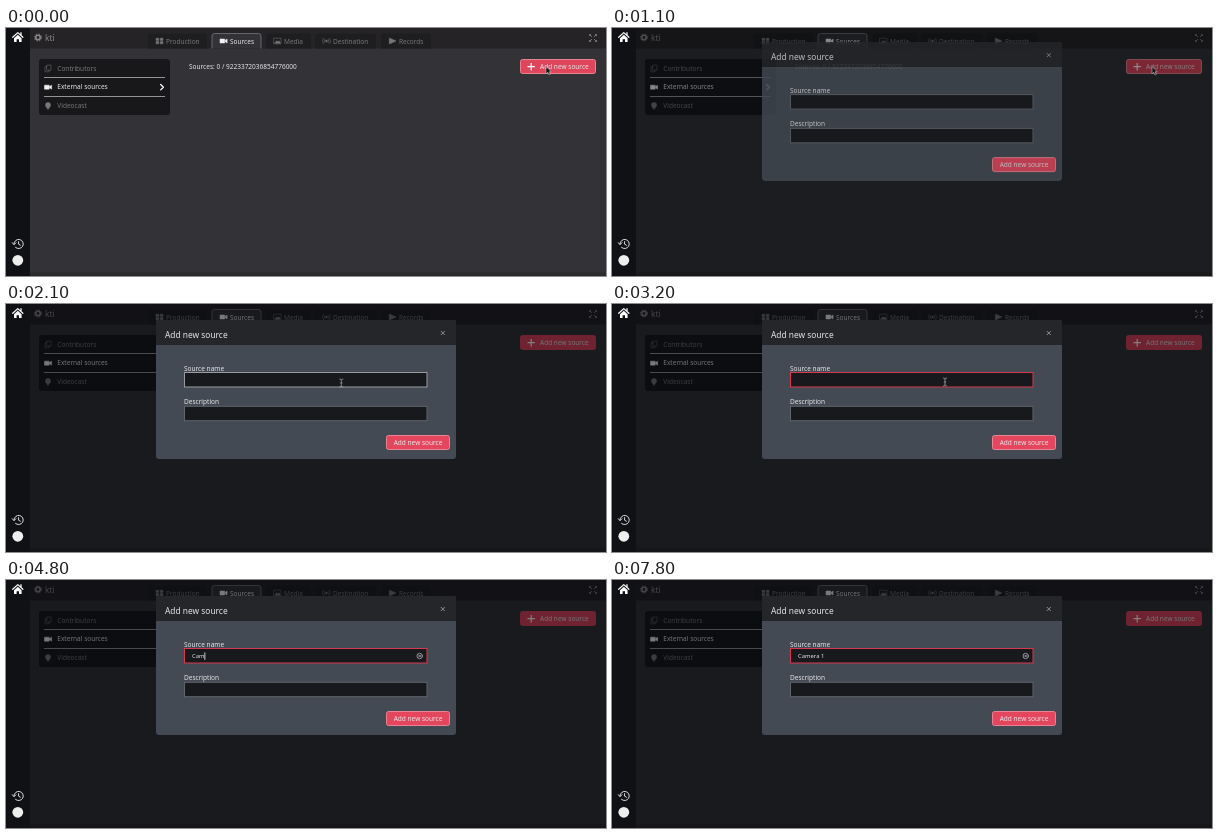
Recreate the animation shown at these times as an HTML page. Size 600 by 248 pixels, loop 8000 ms.

```html
<!DOCTYPE html>
<html lang="en">
<head>
<meta charset="utf-8">
<title>Add new source</title>
<style>
  html, body { margin: 0; width: 100%; height: 100%; overflow: hidden; background: #333337; }
  svg { display: block; width: 100%; height: 100%; }
  text { font: 6.53px "Noto Sans", "Open Sans", sans-serif; fill: #e6e6e8; white-space: pre; }
  .title { font-size: 8.4px; }
  .value { font-size: 5.9px; }
  .dim text { fill: #77777b; }
  .tab { fill: #1e1e21; }
  .line { fill: none; stroke-linecap: round; stroke-linejoin: round; }
</style>
</head>
<body>
<svg viewBox="0 0 600 248">
  <defs>
    <g id="camera"><path d="M-3.5-2h4.7v4h-4.7zM1.6-.6 3.6-2v4L1.6.6z"/></g>
    <g id="stack" class="line"><path d="M-1-3.2h4v5h-4zM-1-1.5h-2v5h4V1.8"/></g>
    <g id="pin"><path d="M0 3.6C-1 1.8-2.6.6-2.6-1a2.6 2.6 0 0 1 5.2 0C2.6.6 1 1.8 0 3.6z"/></g>
    <g id="grid"><path d="M-3.5-2.8h2.8v2.2h-2.8zM.7-2.8h2.8v2.2H.7zM-3.5.6h2.8v2.2h-2.8zM.7.6h2.8v2.2H.7z"/></g>
    <g id="image"><path class="line" d="M-3.5-2.8h7v5.6h-7z"/><path d="M-2.8 2.2-.8-.3.4 1 1.5-.3 2.9 2.2z"/></g>
    <g id="signal"><circle r=".9"/><path class="line" d="M-1.8-1.6q-1.2 1.6 0 3.2M1.8-1.6q1.2 1.6 0 3.2M-3.2-2.8q-1.8 2.8 0 5.6M3.2-2.8q1.8 2.8 0 5.6"/></g>
    <g id="play"><path d="M-3.2-3 3.6 0l-6.8 3z"/></g>
  </defs>

  <rect width="600" height="248" fill="#333337"/>
  <rect width="600" height="20.5" fill="#252326"/>
  <rect y="244.5" width="600" height="3.5" fill="#2c2a2d"/>
  <g stroke="#88888c" fill="none">
    <circle cx="32" cy="9.5" r="2.2" stroke-width="1.6"/>
    <circle cx="32" cy="9.5" r="3.5" stroke-width="1" stroke-dasharray="1.4 1.35"/>
    <path d="M583.5 8V6.5H585M589 6.5h1.5V8M590.5 12v1.5H589M585 13.5h-1.5V12M584 7l2 2M590 7l-2 2M590 13l-2-2M584 13l2-2" stroke-width=".8"/>
  </g>
  <text class="title" x="39" y="12.7" style="fill:#88888c">kti</text>

  <g id="tabs"></g>

  <rect x="33" y="31" width="131" height="56" rx="3" fill="#18181b"/>
  <path d="M38 49.5h121M38 68.5h121" stroke="#949498"/>
  <g id="menu"></g>
  <path class="line" d="m154.7 56.5 2.7 2.7-2.7 2.7" stroke="#fff" stroke-width="1.3"/>

  <text x="183" y="41.3">Sources: 0 / 9223372036854776000</text>

  <rect id="add" x="514.5" y="31.5" width="75" height="14" rx="2" fill="#df455b"/>
  <path d="M521.5 38.7h7.4M525.2 35v7.4" stroke="#fff" stroke-width="1.2"/>
  <text x="534" y="41.1">Add new source</text>

  <rect id="shade" width="600" height="248" fill="#010306"/>

  <g id="dialog">
    <rect x="150" y="16" width="300" height="139" rx="3" fill="#434a53"/>
    <path d="M150 41V19q0-3 3-3h294q3 0 3 3v22z" fill="#24262a"/>
    <text class="title" x="159" y="33.5">Add new source</text>
    <path d="m434.8 27 4 4m0-4-4 4" stroke="#a5a8ac" stroke-width=".8"/>
    <text x="178" y="66.6">Source name</text>
    <rect id="name" x="178.5" y="68.5" width="242.5" height="14.5" fill="#17191d"/>
    <text id="value" class="value" x="186" y="78.2"></text>
    <path id="caret" d="M0 72.5v7.3" stroke="#fff" stroke-width=".8"/>
    <g id="clear" class="line" stroke="#b0b2b6" stroke-width=".8">
      <circle cx="413.7" cy="76" r="2.7"/><path d="m412.7 75 2 2m0-2-2 2"/>
    </g>
    <text x="178" y="100">Description</text>
    <rect x="178.5" y="102.3" width="242.5" height="14.4" fill="#17191d" stroke="#60656c"/>
    <rect x="380.5" y="131.5" width="63" height="14" rx="2" fill="#e4475d" stroke="#e98391"/>
    <text x="387.7" y="141">Add new source</text>
  </g>

  <rect width="24" height="248" fill="#101115"/>
  <path class="line" d="m6.7 9.3 5.1-4.7 5.1 4.7M15 4.6v2.5" stroke="#fff" stroke-width="1.2"/>
  <path d="m8 10.2 3.8-3.5 3.8 3.5V14H13v-2.8h-2.4V14H8z" fill="#fff"/>
  <path class="line" d="M8 216a4.6 4.6 0 1 1 1.5 3.4M6.3 214.7 8 216.7l1.9-2M12.6 213.6v2.6l1.8 1" stroke="#ddd"/>
  <circle cx="11.8" cy="232.3" r="5.4" fill="#eee"/>

  <path id="arrow" d="M0 0v7.4l1.8-1.6 1.2 2.7 1.3-.6-1.2-2.6h2.3z" fill="#111" stroke="#ddd" stroke-width=".5"/>
  <path id="beam" class="line" d="M-1.6-4q1.6 0 1.6 1v6q0 1-1.6 1M1.6-4Q0-4 0-3M1.6 4Q0 4 0 3M-.8 0h1.6" stroke="#aaa" stroke-width=".7"/>
</svg>
<script>
const $ = id => document.getElementById(id);
const set = (id, attrs) => Object.entries(attrs).forEach(([k, v]) => $(id).setAttribute(k, v));
const show = (id, on) => set(id, { opacity: on ? 1 : 0 });

const icon = (name, x, y, color) =>
  `<use href="#${name}" x="${x}" y="${y}" fill="${color}" stroke="${color}" stroke-width=".5"/>`;

const GREY = '#77777b', WHITE = '#f2f2f3';

$('tabs').innerHTML = [
  ['Production', 142, 201, 'grid'], ['Sources', 206, 255, 'camera'], ['Media', 260, 305, 'image'],
  ['Destination', 309, 370, 'signal'], ['Records', 375, 425, 'play'],
].map(([label, left, right, name]) => {
  const on = label === 'Sources';
  const shape = `M${left} 20.5V8q0-2.5 2.5-2.5H${right - 2.5}q2.5 0 2.5 2.5V20.5`;
  return `<g class="${on ? '' : 'dim'}"><path class="tab" d="${shape}"
    ${on ? 'style="fill:#333337" stroke="#77777b" stroke-width=".8"' : ''}/>
    ${icon(name, left + 11.5, 13, on ? WHITE : GREY)}
    <text x="${left + 18}" y="15.6">${label}</text></g>`;
}).join('');

$('menu').innerHTML = [
  ['Contributors', 'stack'], ['External sources', 'camera'], ['Videocast', 'pin'],
].map(([label, name], i) => {
  const on = i === 1, y = 40.3 + i * 18.85;
  return `<g class="${on ? '' : 'dim'}">${icon(name, 42, y, on ? WHITE : GREY)}
    <text x="51.3" y="${y + 2.2}">${label}</text></g>`;
}).join('');

// Last step whose start time has been reached
const at = (steps, t) => steps.filter(s => s[0] <= t).pop()[1];

const fade = [[0, 0], [1000, .12], [1100, .8], [1200, .96], [1300, 1]];
const typed = [[0, ''], [3900, 'C'], [4400, 'Ca'], [4800, 'Cam'], [5000, 'Came'],
  [5200, 'Camer'], [5600, 'Camera'], [7000, 'Camera '], [7100, 'Camera 1']];
const caret = [[0, 0], [2600, 1], [3200, 0], [3600, 1], [6100, 0], [6500, 1], [7600, 0]];
const pointer = [[0, [540, 38.5]], [1900, [488, 52]], [2000, [408, 68]],
  [2100, [335.3, 79]], [2200, [333, 78]]];
const border = [[0, '#60656c'], [2100, '#989ca2'], [2600, '#a97d86'],
  [2700, '#c0566a'], [2800, '#d8394f']];

function draw(now) {
  const t = Math.floor(now % 8000 / 100) * 100;
  const p = at(fade, t);
  set('shade', { opacity: Math.sqrt(p) / 2 });
  set('dialog', { opacity: p, transform: `translate(0 ${-9.5 * (1 - p)})` });
  set('add', { stroke: t < 1900 ? '#e98391' : '#df455b' });

  set('name', { stroke: at(border, t) });
  const text = at(typed, t);
  if ($('value').textContent !== text) $('value').textContent = text;
  const width = text ? $('value').getComputedTextLength() : 0;
  set('caret', { transform: `translate(${186.3 + width} 0)` });
  show('caret', at(caret, t));
  show('clear', text);

  const place = `translate(${at(pointer, t)})`;
  set('arrow', { transform: place });
  set('beam', { transform: place });
  show('arrow', t < 2100);
  show('beam', t >= 2100 && t < 3900);
}

const start = performance.now();
function loop() {
  draw(performance.now() - start);
  requestAnimationFrame(loop);
}
loop();
</script>
</body>
</html>
```
